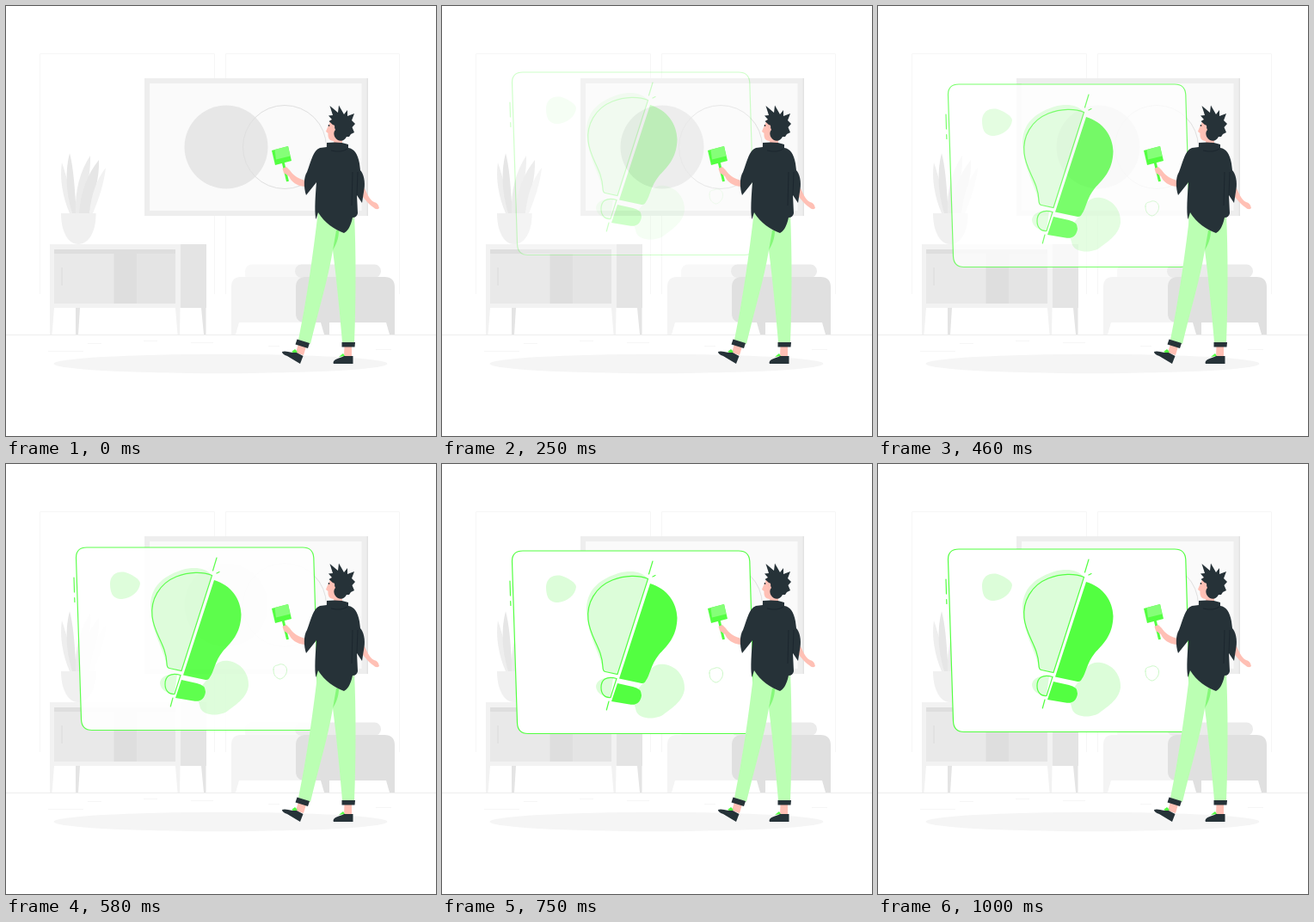
These frames come from a looping animation (500x500 px, 1.04 s). An HTML page:

```html
<!DOCTYPE html>
<html lang="en">
<head>
<meta charset="utf-8">
<title>Painting an idea</title>
<style>
html, body { margin: 0; height: 100%; overflow: hidden; background: #fff }
svg { display: block; width: 100vw; height: 100vh }
</style>
</head>
<body>
<svg viewBox="0 0 500 500">
  <!-- walls and floor -->
  <g fill="none" stroke="#f6f6f6">
    <path d="M39.5 335V55.5H242.5V335M255.5 335V55.5H457.5V335"/>
    <path stroke="#eee" d="M0 382.5H500"/>
    <path d="M160 389.5H176M215 391.5H241M305 395.5H318M49 401.5H90M95 392.5H111M430 399.5H448"/>
  </g>
  <ellipse cx="249.500" cy="416" rx="194" ry="11.200" fill="#f5f5f5"/>

  <!-- framed picture -->
  <path fill="#eee" d="M161 84H421V244H161Z"/>
  <path fill="#e3e3e3" d="M419.500 84H421V244H419.500Z"/>
  <path fill="#fafafa" d="M167 90H413.500V238H167Z"/>
  <circle cx="256" cy="164" r="48.500" fill="#e7e7e7"/>
  <circle cx="324" cy="164" r="48.500" fill="none" stroke="#dfdfdf"/>

  <!-- plant -->
  <g fill="#e6e6e6">
    <path fill="#eee" d="M74 241C66 223 62 200 65 182C71 200 76 220 78 241Z"/>
    <path d="M77 241C69 215 69 190 74 171C79 190 80 215 82 241Z"/>
    <path fill="#ebebeb" d="M81 241C80 215 86 192 98 174C99 196 92 220 86 241Z"/>
    <path d="M85 241C87 215 95 195 108 179C109 200 102 220 97 241Z"/>
    <path fill="#f2f2f2" d="M97 241C99 220 105 202 116 188C114 206 108 224 101 241Z"/>
  </g>
  <path fill="#f0f0f0" d="M64 241H104.500C105 262 96 277 84 277S64 262 64 241Z"/>

  <!-- cabinet -->
  <path fill="#e4e4e4" d="M202 277H233V351H202ZM81 351H86L84 382H81ZM227 351H232.500V382H230Z"/>
  <path fill="#f2f2f2" d="M51 277H203V351H202.500L202 382H199.500L197 351H56L53.500 382H51Z"/>
  <path fill="#e9e9e9" d="M56 283H126V346H56Z"/>
  <path fill="#dedede" d="M125.500 283H152V346H125.500Z"/>
  <path fill="#e4e4e4" d="M152 283H197V346H152Z"/>
  <path fill="#dedede" d="M56 283H197V288H56Z"/>
  <path stroke="#dadada" d="M65 304V325"/>

  <!-- sofa -->
  <rect x="278" y="300.500" width="90" height="20" rx="8" fill="#f8f8f8"/>
  <path fill="#f4f4f4" d="M262 382V327Q262 315 273 315H360V368H271L267 382Z"/>
  <rect x="336" y="300.500" width="100" height="15.500" rx="7.500" fill="#ebebeb"/>
  <path fill="#e0e0e0" d="M349 315H440Q452 315 452 327V382H446L442 368H376V382H370L366 368H348Q337 368 337 357V327Q337 315 349 315Z"/>

  <!-- sliding panel, drawn at its resting height -->
  <g id="panel" fill="none" stroke="#53ff41" stroke-width="1.200" stroke-linecap="round">
    <path fill="#fff" d="M94 101H345Q357 101 357.800 113L363.500 301Q364 313.500 352 313.500H100Q88 313.500 87.500 301L81.500 113Q81.500 101 94 101Z"/>
    <path d="M79 136L79.500 153M79.700 159.500L79.900 164.500"/>
    <g fill="#dcfdd9" stroke="none">
      <path d="M121 142C122 132 130 128 139 130C146 132 156 138 156 143C155 152 146 160 135 161C123 161 121 153 121 142Z"/>
      <path d="M168 168C169 143 187 133 205 127C220 123 232 125 239 133L204 245L187 240C186 223 168 200 168 168Z"/>
      <path d="M236 252C240 238 248 231 259 233C273 235 283 248 282 262C280 277 265 285 258 291C250 297 231 298 226 288L221 270Z"/>
      <path d="M199 249C188 247 179 252 179 259C180 267 187 271 196 271Z"/>
    </g>
    <path stroke="#fff" stroke-width="4" d="M243 131L194 283"/>
    <path d="M239.500 133.500C229 129 213 129 198 135C178 143 168 162 170 181C172 202 186 213 187 236Q187 241 190 241.500L204 244.500Z"/>
    <path d="M203 249.500C191 246 185 251 185 260C185 267 189 272 196 271.500Z"/>
    <path d="M245 113L240.500 128M245 131L248 129.500M194 276L191.300 286"/>
    <g fill="#53ff41" stroke="none">
      <path d="M242 139C262 145 273 161 273.500 179C273 202 261 212 252 222C243 233 242 245 237 252Q235.500 255.500 232 255L206 249.500Z"/>
      <path d="M204 255L222 259Q232 261 232 269C231 277 226 281 218 279.500L197 276Z"/>
    </g>
    <path stroke="#cdf9c8" stroke-width="1" d="M311 243C311 237 315 239 318 237C321 236 326 238 326.500 243C327 249 322 254 318 254C313 252 311 249 311 243Z"/>
  </g>

  <!-- brush -->
  <path stroke="#53ff41" stroke-width="3" d="M322 181L327.500 204"/>
  <path fill="#53ff41" d="M309 168L328 163L332 180L313 185Z"/>
  <path fill="#85ff78" d="M312.500 167L328 163L330.300 174.500L314 178.500Z"/>

  <!-- painter -->
  <g fill="#ffc0b5">
    <path d="M348 203C340 201 333 196 330 191L326 187L321.500 189L323 194L329 198C332 205 338 209 347 210Z"/>
    <path d="M416 211C420 217 422 225 428 228Q433 229 434 235Q431 238 427 234C420 229 418 225 415 222Z"/>
    <path d="M378 132C375 139 373 143 372 146L374.500 148C374 153 376 157 381 157L382 162H391V145L384 132Z"/>
    <path d="M340 393L349 396L346 406L337 403ZM393.500 395H402V408H393Z"/>
  </g>
  <path fill="#bbffb3" d="M363 238L405 242C407 285 407 340 405 391H391C388 355 384 315 380 284C374 320 363 355 354 393L340 388C349 345 357 290 363 238Z"/>
  <path fill="#85f879" d="M380 284L384 261L387 261C387 270 384 277 380 284Z"/>
  <path fill="#53ff41" d="M332 402L336 399L339 402L336 404ZM387 408L392 404L394 407Z"/>
  <g fill="#263238">
    <path d="M338.500 387.500L353 392L351 398L336.500 393.500ZM390.500 391H406L405.500 396.500H390.500Z"/>
    <path d="M321 402Q324 400.500 333 403L338 403L345.500 407L342 416L327 407Q321 405 321 402ZM380.500 415C381 410 388 410 393 407H403.500V416H381Z"/>
    <path d="M381 139L375.500 134L379 132L375 127.500L380 127L376.500 116L386 124L387 115.500L393 126L397 121L397 128L405 125L402 133L406 137L402.500 141L405 147L401 149L399 152L396 152C394 156 390 158 386 156C381 153 380 147 383 144Z"/>
    <path d="M373 159C381 158 391 158 398 161V165C405 166 409 172 411 183L412 191C416 195 418 205 416.500 213L414 229L408 220L409 241Q408 246 403 246L402 250C400 257 397 262 393 264C382 260 370 252 363 240L360.500 248Q358 240 361 205L349 220C346 211 346 199 350 193C355 180 357 168 365 165L373 164Z"/>
    <circle cx="375.500" cy="139" r="0.900"/>
  </g>
  <path fill="#ffc0b5" d="M378 141Q380 137 382 139Q383 144 379 146Z"/>
  <path fill="none" stroke="#17222a" stroke-width="0.700" d="M378 168Q390 171 397 166M403 193L402 232M408 220L409 193"/>
</svg>
<script>
const LOOP = 1040, STEP = LOOP / 25, REST = 101;
// [step, panel top, opacity]
const KEYS = [
  [4, 73.6, .08], [5, 75, .17], [6, 77, .28], [9, 85.5, .6], [11, 91, .77],
  [14, 97, .93], [16, 99.7, .98], [18, 101, 1], [20, 101.2, 1], [24, 99, 1]
];
const panel = document.getElementById('panel');
const start = performance.now();

function pose(step) {
  const i = KEYS.findIndex(k => k[0] >= step);
  const b = KEYS[i], a = KEYS[Math.max(0, i - 1)];
  const p = a === b ? 0 : (step - a[0]) / (b[0] - a[0]);
  return [1, 2].map(j => a[j] + (b[j] - a[j]) * p);
}

function draw() {
  const t = (performance.now() - start) % LOOP;
  const step = Math.min(24, Math.floor((t + 4) / STEP));
  const [top, alpha] = step < 4 ? [REST, 0] : pose(step);
  panel.setAttribute('transform', `translate(0 ${top - REST})`);
  panel.setAttribute('opacity', alpha);
  requestAnimationFrame(draw);
}
draw();
</script>
</body>
</html>
```
